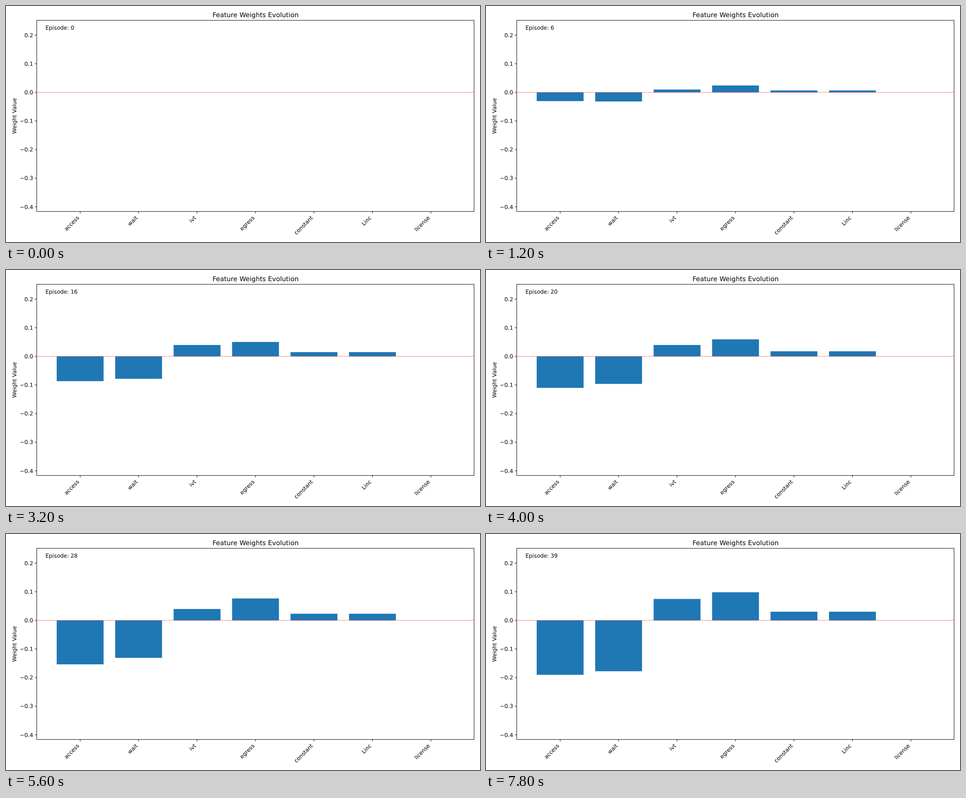
Write an HTML page that moves like this. It is 1058 by 529 pixels and loops after 8 s.

```html
<!DOCTYPE html>
<html lang="en">
<head>
<meta charset="utf-8">
<title>Feature Weights Evolution</title>
<style>
  html, body { margin: 0; width: 100%; height: 100%; overflow: hidden; background: #fff; }
  svg { display: block; width: 1058px; height: 529px; }
  text { font: 12.25px "DejaVu Sans", sans-serif; text-rendering: geometricPrecision; }
  .title { font-size: 14.7px; }
  .mid { text-anchor: middle; }
  .end { text-anchor: end; }
  .axis { fill: none; stroke: #000; stroke-width: 1; }
</style>
</head>
<body>
<svg viewBox="0 0 1058 529">
  <g id="bars" fill="#1f77b4"></g>
  <path d="M68.6 193.6H1045" stroke="#f00" stroke-opacity=".3" stroke-width="1.8"/>
  <g id="ticks"></g>
  <rect class="axis" x="68.6" y="32.1" width="976.2" height="428.5"/>
  <text class="title mid" x="557.2" y="24.8">Feature Weights Evolution</text>
  <text class="mid" transform="translate(22.5 246.4) rotate(-90)">Weight Value</text>
  <text id="episode" x="88.1" y="53.4">Episode: 0</text>
</svg>
<script>
const STEP = 200, EPISODES = 40;
const ZERO = 193.6, UNIT = 641.5;
const LEFT = 68.6, BOTTOM = 460.6, TICK = 4.3;
const FIRST = 165.5, GAP = 130.48, BAR = 104.6;

const ramp = (n, from, to) => Math.min(1, Math.max(0, (n - from) / (to - from)));

// Bar height in px, upwards positive; n is the episode, t runs from 0 to 1
const income = t => 19.4 * t ** 0.8;
const features = {
  access: t => -122 * (t + 0.09 * Math.sin(Math.PI * t * t)),
  wait: t => -114 * t ** 0.92,
  ivt: (t, n) => 25.5 * ramp(n, 5, 9) + 22.5 * ramp(n, 32, 39),
  egress: t => 63 * t ** 0.75,
  constant: income,
  Linc: income,
  license: () => 0
};

function add(parent, tag, attrs, text = "") {
  const el = document.createElementNS("http://www.w3.org/2000/svg", tag);
  for (const key in attrs) el.setAttribute(key, attrs[key]);
  el.textContent = text;
  return document.getElementById(parent).appendChild(el);
}

for (let k = 2; k >= -4; k--) {
  const y = ZERO - k / 10 * UNIT;
  add("ticks", "path", { class: "axis", d: `M${LEFT} ${y}h${-TICK}` });
  add("ticks", "text", { class: "end", x: 60.5, y: y + 4.4 },
    (k < 0 ? "\u2212" : "") + Math.abs(k / 10).toFixed(1));
}

const bars = Object.entries(features).map(([name, height], i) => {
  const x = FIRST + i * GAP;
  add("ticks", "path", { class: "axis", d: `M${x} ${BOTTOM}v${TICK}` });
  add("ticks", "text", { class: "end", transform: `translate(${x - 1.4} 475.6) rotate(-45)` }, name);
  const rect = add("bars", "rect", { x: x - BAR / 2, width: BAR });
  return { rect, height };
});

const label = document.getElementById("episode");
let shown = -1;

function draw(now) {
  const n = Math.floor(now / STEP) % EPISODES;
  if (n !== shown) {
    shown = n;
    label.textContent = `Episode: ${n}`;
    for (const { rect, height } of bars) {
      const h = height(n / (EPISODES - 1), n);
      rect.setAttribute("y", ZERO - Math.max(0, h));
      rect.setAttribute("height", Math.abs(h));
    }
  }
  requestAnimationFrame(draw);
}
draw(performance.now());
</script>
</body>
</html>
```
